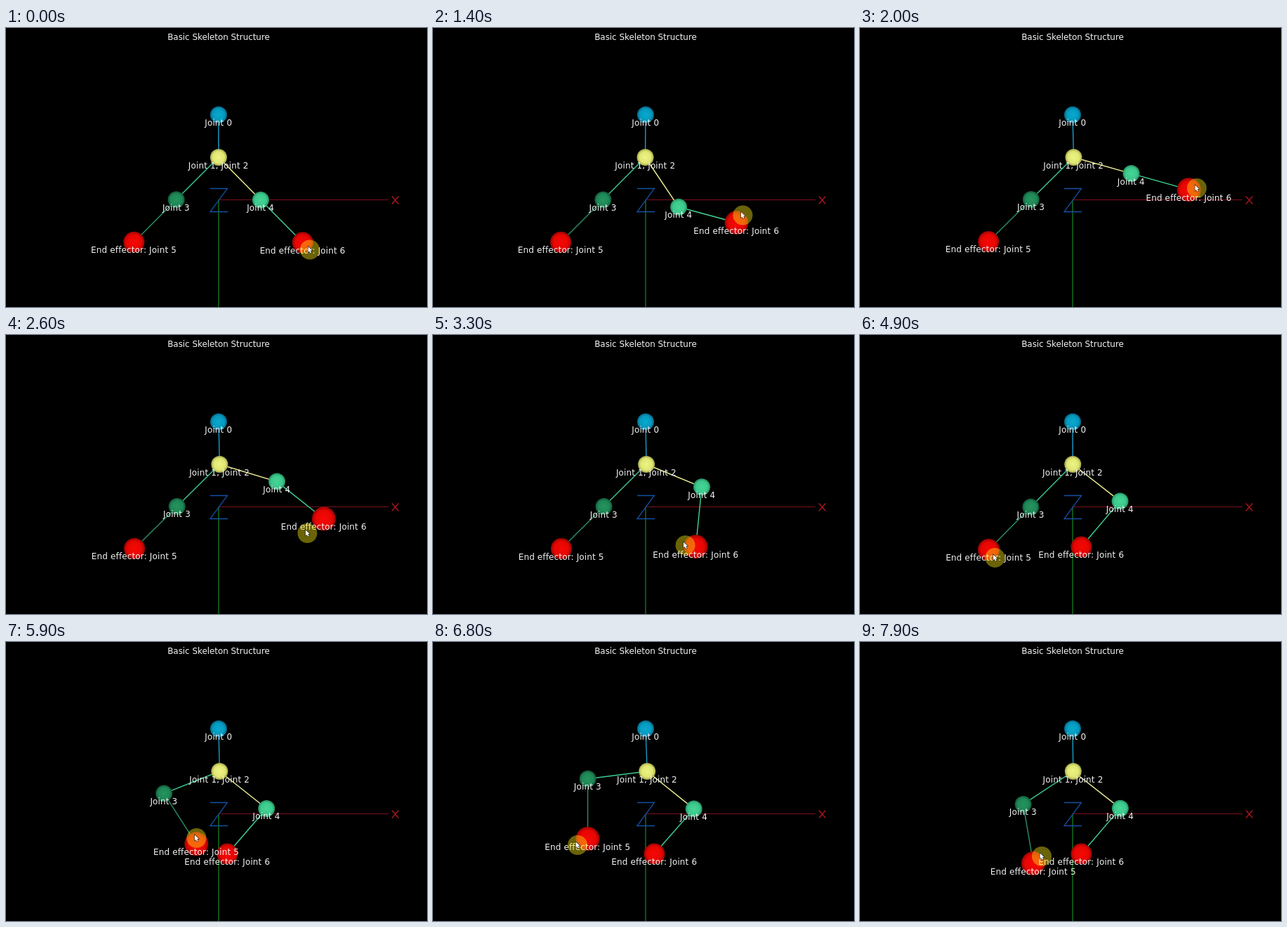
These frames come from a looping animation (600x397 px, 8000 ms). An HTML page with a canvas:

```html
<!DOCTYPE html>
<html lang="en">
<head>
<meta charset="utf-8">
<title>Basic Skeleton Structure</title>
<style>
  html, body { margin: 0; width: 100%; height: 100%; overflow: hidden; background: #000; }
  canvas { display: block; width: 600px; height: 397px; }
</style>
</head>
<body>
<canvas id="stage"></canvas>
<script>
const W = 600, H = 397, LOOP = 8000;
const BONE = 85.3;                   // length of each arm bone
const LAG = 150;                     // a dragged hand trails the mouse
const FLIP = 2000;                   // right elbow turns outward while stretched
const DROP = 4050, GRAB = 4700;      // right hand released, left hand taken
const canvas = document.getElementById('stage');
const ctx = canvas.getContext('2d');
const dpr = window.devicePixelRatio || 1;
canvas.width = W * dpr;
canvas.height = H * dpr;

// Key points of the mouse: time, x, y
const keys = [
  [700, 433, 315.5], [1250, 432.5, 277], [1400, 441.5, 266.5], [FLIP, 480, 228],
  [2450, 453, 261.5], [2600, 429.5, 282], [3000, 389, 302], [3750, 325.5, 294],
  [3900, 321.5, 308], [DROP, 315.5, 301.5], [4600, 176, 311], [GRAB, 176, 311],
  [5000, 205, 319], [5450, 270, 306], [5900, 271.5, 279], [6300, 250, 267],
  [6650, 220.5, 280], [6800, 206, 289], [7000, 199, 312], [7300, 220, 331],
  [7750, 247, 315], [7900, 259, 305]];

// Smooth curve through the keys, without overshoot
function mouse(t) {
  const last = keys.length - 1;
  if (t <= keys[0][0]) return keys[0].slice(1);
  if (t >= keys[last][0]) return keys[last].slice(1);
  const i = keys.findIndex(k => k[0] > t) - 1;
  const span = keys[i + 1][0] - keys[i][0], u = (t - keys[i][0]) / span;
  const rate = (k, c) => (keys[k + 1][c] - keys[k][c]) / (keys[k + 1][0] - keys[k][0]);
  const slope = (k, c) => {
    if (k === 0 || k === last) return 0;
    const p = rate(k - 1, c), q = rate(k, c);
    return p * q <= 0 ? 0 : 2 * p * q / (p + q);
  };
  return [1, 2].map(c => {
    const d = keys[i + 1][c] - keys[i][c], m0 = slope(i, c) * span, m1 = slope(i + 1, c) * span;
    return keys[i][c] + u * (m0 + u * (3 * d - 2 * m0 - m1 + u * (m0 + m1 - 2 * d)));
  });
}

// Two-bone arm: returns elbow and hand, stretched if the goal is too far
function arm([x, y], goal, side) {
  const dx = goal[0] - x, dy = goal[1] - y, far = Math.hypot(dx, dy);
  const half = Math.min(far / 2, BONE), bend = side * Math.sqrt(BONE * BONE - half * half);
  const ux = dx / far, uy = dy / far;
  return [
    [x + ux * half - uy * bend, y + uy * half + ux * bend],
    [x + ux * half * 2, y + uy * half * 2]];
}

function pose(t) {
  const late = t - LAG;
  const goalL = mouse(Math.max(late, GRAB)), goalR = mouse(Math.min(late, DROP));
  const side = late < FLIP ? 1 : -1;
  const chest = [303, 184];
  let left, right;
  for (let pass = 0; pass < 2; pass++) {
    left = arm(chest, goalL, 1);
    right = arm(chest, goalR, side);
    // raised elbows push the chest a little sideways
    chest[0] = 303 + 0.04 * (488 - left[0][1] - right[0][1]);
  }
  left = arm(chest, goalL, 1);
  right = arm(chest, goalR, side);
  return [[303, 123.5], chest, left[0], right[0], left[1], right[1]];
}

// Hands grow while held
const clamp = v => Math.max(0, Math.min(1, v));
const handSize = (t, from, to) => 15 + 2 * clamp((t - from) / 800) * clamp((to - t) / 300);

function path(points, color, width = 1.2) {
  ctx.beginPath();
  points.forEach(p => ctx.lineTo(p[0], p[1]));
  ctx.strokeStyle = color;
  ctx.lineWidth = width;
  ctx.stroke();
}

function disc([x, y], r, fill) {
  ctx.fillStyle = fill;
  ctx.beginPath();
  ctx.arc(x, y, r, 0, 2 * Math.PI);
  ctx.fill();
}

function ball(p, r, [light, mid, edge]) {
  const g = ctx.createRadialGradient(p[0], p[1], 0, p[0], p[1], r);
  g.addColorStop(0, light);
  g.addColorStop(0.7, mid);
  g.addColorStop(1, edge);
  disc(p, r, g);
}

function text(str, x, y, spacing) {
  ctx.font = '12px "DejaVu Sans", sans-serif';
  ctx.letterSpacing = spacing + 'px';
  ctx.textAlign = 'center';
  ctx.fillStyle = '#f2f2f2';
  ctx.fillText(str, x, y);
}
const label = (str, p) => text(str, p[0] - 0.3, p[1] + 15.5, 0.14);

const BLUE = ['#08a9d0', '#0699be', '#066684'];
const YELLOW = ['#eef484', '#e0e672', '#a0a44c'];
const GREEN = ['#24955f', '#1f8756', '#125537'];
const MINT = ['#44d697', '#3cc88b', '#278d60'];
const RED = ['#f60804', '#e60603', '#980402'];

function axes() {
  path([[303, 244.5], [545, 244.5]], '#7c121e');
  path([[303, 244.5], [303, H]], '#14761a', 1.4);
  path([[291, 228.5], [315.5, 228.5], [291, 261.5], [316, 261.5]], '#1550a4', 1.3);
  path([[550, 239.5], [559.5, 250.5]], '#a8161f', 1.4);
  path([[559.5, 239.5], [550, 250.5]], '#a8161f', 1.4);
}

function pointer(p) {
  disc(p, 14, 'rgba(255,235,20,.42)');
  ctx.beginPath();
  [[0, 0], [0, 8], [1.8, 6.4], [3.2, 9.2], [4.6, 8.5], [3.4, 5.8], [5.8, 5.6]]
    .forEach(([a, b]) => ctx.lineTo(p[0] - 2.5 + a, p[1] - 4.5 + b));
  ctx.closePath();
  ctx.strokeStyle = '#222';
  ctx.lineWidth = 1.2;
  ctx.stroke();
  ctx.fillStyle = '#fff';
  ctx.fill();
}

function draw(t) {
  ctx.setTransform(dpr, 0, 0, dpr, 0, 0);
  ctx.fillStyle = '#000';
  ctx.fillRect(0, 0, W, H);
  axes();

  const [head, chest, elbowL, elbowR, handL, handR] = pose(t);
  path([head, chest], '#1a9cc6', 1.4);
  path([chest, elbowL], '#3ccb91', 1.4);
  path([chest, elbowR], '#f0f098', 1.4);
  path([elbowL, handL], '#2c9064', 1.4);
  path([elbowR, handR], '#42d495', 1.4);

  ball(head, 12, BLUE);
  ball(chest, 12, YELLOW);
  ball(elbowL, 12, GREEN);
  ball(elbowR, 12, MINT);
  ball(handL, handSize(t, GRAB, LOOP + 500), RED);
  ball(handR, handSize(t, 700, DROP + 200), RED);

  label('Joint 0', head);
  label('Joint 1, Joint 2', chest);
  label('Joint 3', elbowL);
  label('Joint 4', elbowR);
  label('End effector: Joint 5', handL);
  label('End effector: Joint 6', handR);
  text('Basic Skeleton Structure', 303, 17, -0.06);

  pointer(mouse(t));
}

// Ten steps a second, with every fifth one held
function step(ms) {
  const t = Math.floor(ms % LOOP / 100) * 100;
  return t % 500 === 200 ? t - 100 : t;
}

const start = performance.now();
function tick() {
  draw(step(Math.max(0, performance.now() - start)));
  requestAnimationFrame(tick);
}
tick();
</script>
</body>
</html>
```
